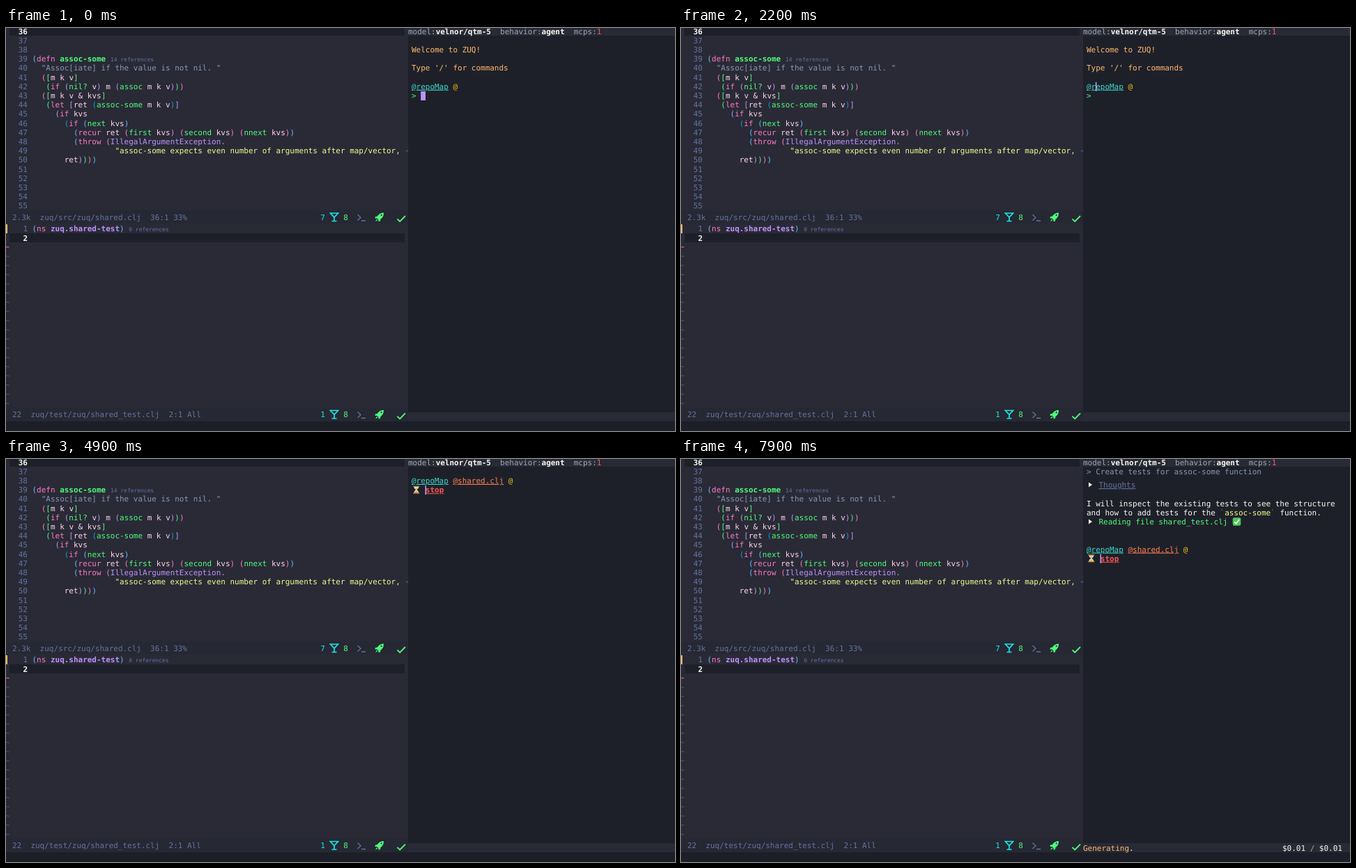
Recreate the animation shown at these times as an HTML page. Size 960 by 579 pixels, loop 8 s.

```html
<!DOCTYPE html>
<html lang="en">
<head>
<meta charset="utf-8">
<title>Editor chat session</title>
<style>
html, body { margin: 0; width: 100%; height: 100%; overflow: hidden; background: #1e2029; }
svg { display: block; width: 960px; height: 579px; }
text { font: 10.98px "DejaVu Sans Mono", monospace; white-space: pre; text-rendering: geometricPrecision; }
.b { font-weight: bold; }
.i { font-style: italic; }
.u { text-decoration: underline; }
.s { font-size: 7.95px; }
</style>
</head>
<body>
<svg viewBox="0 0 960 579">
  <defs>
    <clipPath id="code"><rect width="572" height="579"/></clipPath>
    <clipPath id="tip"><rect width="958.5" height="579"/></clipPath>
  </defs>
  <g id="fixed"></g>
  <g id="chat"></g>
</svg>
<script>
const LOOP = 8000, W = 6.61, H = 13.21, LEFT = 37.5, CHAT = 582;
const FG = '#f8f8f2', DIM = '#6672a0', PINK = '#ff79c6', GREEN = '#50fa7b', VIOLET = '#bd93f9',
  YELLOW = '#f1fa8c', ORANGE = '#ffb86c', CYAN = '#19e6e6', RED = '#ff5555', VAR = '#ffd3ec',
  DOC = '#8995b4', GOLD = '#efc01e', TURQ = '#3dd6c8', CORAL = '#ff7f50', LABEL = '#a3a5b8';
const DEPTH = ['#61bfff', PINK, GREEN, VIOLET, '#0f9bd8'];

const row = r => 8.5 + r * H;
const col = c => CHAT + c * W;
const esc = s => s.replace(/&/g, '&amp;').replace(/</g, '&lt;').replace(/>/g, '&gt;');
const rect = (x, y, w, h, fill) => `<rect x="${x}" y="${y}" width="${w}" height="${h}" fill="${fill}"/>`;
const stroke = (d, c, w = 1.4) => `<path d="${d}" fill="none" stroke="${c}" stroke-width="${w}"/>`;
const fill = (d, c) => `<path d="${d}" fill="${c}"/>`;
const at = (x, y, body) => `<g transform="translate(${x} ${y})">${body}</g>`;

// A line of coloured spans: [text, colour, classes]
function line(x, y, ...spans) {
  const body = spans.map(([s, c, k = '']) => `<tspan fill="${c}" class="${k}">${esc(s)}</tspan>`).join('');
  return `<text x="${x}" y="${y}">${body}</text>`;
}

function cut(spans, n) {
  return spans.map(([s, ...rest]) => {
    const part = s.slice(0, Math.max(0, n));
    n -= s.length;
    return [part, ...rest];
  });
}

const KEYWORDS = /^(defn|let|if|recur|throw|ns)$/;
let depth = 0;

// Clojure highlighting with brackets coloured by nesting
function highlight(src) {
  let prev = '';
  return src.match(/"[^"]*"?|[()\[\]]|[^\s()\[\]"]+|\s+/g).map(tok => {
    let c = VAR, k = '';
    if (tok[0] === '"') c = tok.startsWith('"Assoc[') ? DOC : YELLOW;
    else if (/[(\[]/.test(tok)) c = DEPTH[depth++ % 5];
    else if (/[)\]]/.test(tok)) c = DEPTH[--depth % 5];
    else if (prev === 'defn' || prev === 'ns') { c = prev === 'ns' ? VIOLET : GREEN; k = 'b'; }
    else if (KEYWORDS.test(tok)) c = PINK;
    else if (/^[A-Z]/.test(tok)) c = VIOLET;
    else if (prev === '(') c = GREEN;
    if (tok.trim()) prev = tok;
    return [tok, c, k];
  });
}

function lineNumber(n, y, current) {
  return line(31 - String(n).length * W, y, [String(n), current ? FG : DIM, current ? 'b' : '']);
}

function modeline(y, info, count) {
  return rect(0, y - 9.5, 577, 19, '#262833') +
    line(9, y + 4, [info, DIM]) +
    line(451.3, y + 4, [count, CYAN]) + line(484.3, y + 4, ['8', GREEN]) +
    at(471, y, stroke('M-5.5 -5.5H5.5L0 .5ZM0 0V6M-3.5 6H3.5', CYAN, 1.7)) +
    at(510, y, stroke('M-5.5 -3.5L-1 .7L-5.5 5M0 5.5H6', DIM, 1.3)) +
    at(536, y, fill('M6 -6C1 -6 -1.5 -3.5 -3 -1L-6 -.5L-6.5 2L-3.5 2L-1.5 4L-1.5 6.5L1 6L1.5 3C4 1.5 6 -1 6 -6Z', GREEN) +
      fill('M-4 3L-6 6.5L-2.5 4.5Z', GREEN) + '<circle cx="2.7" cy="-2.7" r="1.1" fill="#262833"/>') +
    at(567, y + 2.5, stroke('M-5.5 .3L-1.8 4L6 -4', GREEN, 1.8));
}

function drawFixed() {
  const source = [
    '(defn assoc-some',
    '  "Assoc[iate] if the value is not nil. "',
    '  ([m k v]',
    '   (if (nil? v) m (assoc m k v)))',
    '  ([m k v & kvs]',
    '   (let [ret (assoc-some m k v)]',
    '     (if kvs',
    '       (if (next kvs)',
    '         (recur ret (first kvs) (second kvs) (nnext kvs))',
    '         (throw (IllegalArgumentException.',
    '                  "assoc-some expects even number of arguments after map/vector,  odd count")))',
    '       ret))))'
  ];
  let out = rect(0, 0, 577, 565, '#292a36') + rect(577, 0, 383, 11, '#282a35') +
    rect(577, 552, 383, 13, '#282a35') + rect(0, 565, 960, 14, '#1c1e28') +
    rect(5, 0, 567, 11, '#1e2029') + rect(5, 295, 567, 13, '#1e2029');

  for (let n = 36; n <= 55; n++) out += lineNumber(n, row(n - 36), n === 36);
  out += '<g clip-path="url(#code)">' +
    source.map((s, i) => line(LEFT, row(i + 3), ...highlight(s))).join('') + '</g>';
  out += line(150, row(3), ['14 references', DIM, 's']);
  out += stroke('M573 176.5h4M575.2 174.7l1.8 1.8l-1.8 1.8', '#4b5064', 1);
  out += modeline(271.5, '2.3k  zuq/src/zuq/shared.clj  36:1 33%', '7');

  depth = 0;
  out += rect(0, 282, 2, 13, ORANGE) + lineNumber(1, 292.4) + lineNumber(2, 305.6, true) +
    line(LEFT, 292.4, ...highlight('(ns zuq.shared-test)')) +
    line(176.3, 292.4, ['0 references', DIM, 's']) + rect(0, 314, 4.5, 1.3, '#e0566a');
  for (let i = 1; i < 18; i++)
    out += at(0, 314.8 + i * H, stroke('M0 .6Q1.2 -1.4 2.4 0T4.8 -.6', '#565c74', 1));
  out += modeline(555, '22  zuq/test/zuq/shared_test.clj  2:1 All', '1');

  out += line(577, row(0), ['model:', LABEL], ['velnor/qtm-5', FG, 'b'], ['  behavior:', LABEL],
    ['agent', FG, 'b'], ['  mcps:', LABEL], ['1', RED]);
  return out;
}

const bar = (c, y) => rect(col(c) - .3, y - 10, 1.4, 13, '#c9a6fb');
const REPO = ['@repoMap', TURQ, 'u'], SHARED = ['@shared.clj', CORAL, 'u'], AT = ['@', GOLD], GAP = [' ', FG];
const MESSAGE = 'Create tests for assoc-some function';

function commandTip() {
  const items = [
    ['costs', 'Show the total costs of the current chat'],
    ['repo-map-show', 'Show the actual repoMap of current session'],
    ['resume', 'Resume the chats from this session workspace'],
    ['optimize', '/home/tavk/.config/zuq/commands/optimize.md'],
    ['explain-tag', '/home/tavk/.config/zuq/commands/explain-tag.md']
  ];
  const body = items.map(([name, about], i) => {
    const y = row(8 + i);
    const icon = i < 3
      ? stroke('M-3.5 -4H-5.5V4H-3.5M3.5 -4H5.5V4H3.5', VAR, 1.1) +
        `<circle r="2.3" fill="none" stroke="${PINK}"/>` + stroke('M-2.5 2.5L2.5 -2.5', VAR, 1)
      : stroke('M-2.8 -3L-5.6 0L-2.8 3M2.8 -3L5.6 0L2.8 3M1.5 -4L-1.5 4', '#d8e27c', 1.1);
    return at(580, y - 3.7, icon) + line(588, y, [name.padEnd(13), FG], ['() ' + about, DIM, 'i']);
  }).join('');
  return rect(574, 104.3, 386, 66, '#20222c') + rect(574, 104.3, 386, 13.2, '#292b38') +
    '<g clip-path="url(#tip)">' + body + '</g>';
}

function fileTip(chosen) {
  const items = [['red.clj', 'src/zuq/shared.clj'], ['red_test.clj', 'test/zuq/shared_test.clj']];
  return rect(628, 91.2, 282, 26.4, '#20222c') + rect(628, 91.2 + chosen * H, 282, 13.2, '#2a2c3a') +
    items.map(([rest, path], i) => {
      const y = row(7 + i);
      return at(637, y - 3.8, '<circle r="4.4" fill="none" stroke="#6fb6dc" stroke-width="1.1"/>' +
          stroke('M-4 -2.5L4 2.5M-2 -1.2Q0 -4 2.2 -1M-2.2 1Q0 4 2 1.2', '#6fb6dc', 1)) +
        line(902.3 - path.length * W, y, [path, DIM, 'i']) +
        line(645, y, ['sha', '#8be9fd', 'b'], [rest, FG]);
    }).join('');
}

function composing(t) {
  const typed = 'sha'.slice(0, Math.max(0, Math.floor((t - 2500) / 100)));
  const context = t < 3200 ? [['@' + typed, GOLD]] : t < 3400 ? [['@shared_test.clj', GOLD]]
    : t < 3700 ? [['@shared.clj', GOLD]] : [SHARED, GAP, AT];
  const input = t < 850 ? '' : t < 1750 ? '/' : t < 4050 ? ''
    : MESSAGE.slice(0, Math.ceil((t - 4050) / 700 * MESSAGE.length));
  const end = 9 + context.reduce((n, s) => n + s[0].length, 0);

  let cursor;
  if (t < 500) cursor = rect(col(2), 91, 6.8, 13, VIOLET);
  else if (t < 2000 || t >= 3900) cursor = bar(2 + input.length, row(7));
  else if (t < 2300) cursor = bar(2, row(6));
  else if (t < 2600) cursor = bar(Math.min(10, 3 + Math.floor((t - 2300) / 35)), row(6));
  else cursor = bar(end, row(6));

  return line(CHAT, row(2), ['Welcome to ZUQ!', ORANGE]) +
    line(CHAT, row(4), ["Type '/' for commands", ORANGE]) +
    line(CHAT, row(6), REPO, GAP, ...context) +
    line(CHAT, row(7), ['> ', GREEN], [input, FG]) + cursor +
    (t >= 900 && t < 1750 ? commandTip() : '') +
    (t >= 2850 && t < 3700 ? fileTip(t >= 3200 && t < 3400 ? 1 : 0) : '');
}

function waiting(y) {
  const glass = fill('M-3.6 -4.5H3.6Q3.6 -1.8 .7 0Q3.6 1.8 3.6 4.5H-3.6Q-3.6 1.8 -.7 0Q-3.6 -1.8 -3.6 -4.5Z', '#d5dccb') +
    fill('M-2.6 -2.4H2.6L0 0ZM-3 4L0 1.5L3 4Z', '#e8b23c') + stroke('M-4.5 -4.8H4.5M-4.5 4.8H4.5', '#b98548', 1.4);
  return line(CHAT, y, REPO, GAP, SHARED, GAP, AT) + at(588.8, y + H - 4, glass) +
    line(col(3), y + H, ['stop', RED, 'bu'.split('').join(' ')]) + bar(3, y + H);
}

const ANSWER = [
  [['I will inspect the existing tests to see the structure', FG]],
  [['and how to add tests for the ', FG], ['`', DIM], ['assoc-some', YELLOW], ['`', DIM], [' function.', FG]]
];
const arrow = y => fill(`M585 ${y - 7.5}L590 ${y - 4}L585 ${y - .5}Z`, FG);

function answering(t) {
  if (t < 4950) return waiting(row(2));
  const y0 = 41.1, y = n => y0 + n * H;
  let out = line(CHAT, row(1), ['> ' + MESSAGE, DOC]), prompt = row(4);

  if (t >= 6050) {
    prompt = y(3);
    out += t < 6650 ? line(CHAT, y0, ['Thinking...', DIM, 'u'])
      : arrow(y0) + line(599.5, y0, ['Thoughts', DIM, 'u']);
  }
  if (t >= 7400) {
    const n = Math.ceil((t - 7380) / 370 * 105), first = ANSWER[0][0][0].length;
    out += line(CHAT, y(2), ...cut(ANSWER[0], n)) + line(CHAT, y(3), ...cut(ANSWER[1], n - first));
    prompt = y(n > first ? 6 : 5);
  }
  if (t >= 7800) {
    out += arrow(y(4)) + line(599.5, y(4), ['Reading file shared_test.clj', GREEN]);
    prompt = y(7);
  }
  if (t >= 7850) {
    out += at(797.5, y(4) - 4, '<rect x="-5.8" y="-5.8" width="11.6" height="11.6" rx="2" fill="#4fc75a"/>' +
      stroke('M-3.4 .3L-1 2.8L3.5 -3', '#fff', 1.7));
  }
  const dots = t >= 7650 ? 1 : 1 + Math.floor((t - (t < 6900 ? 4900 : 6900)) / 250) % 3;
  out += line(577, 562.8, ['Generating', ORANGE], ['.'.repeat(dots), FG]);
  if (t >= 7750) out += line(863, 562.8, ['$0.01', FG], [' / ', LABEL], ['$0.01', FG]);
  return out + waiting(prompt);
}

const chat = document.getElementById('chat');
let shown = '';

function draw(t) {
  const next = t < 4900 ? composing(t) : answering(t);
  if (next !== shown) chat.innerHTML = shown = next;
}

function tick() {
  draw(performance.now() % LOOP);
  requestAnimationFrame(tick);
}

document.getElementById('fixed').innerHTML = drawFixed();
tick();
</script>
</body>
</html>
```
